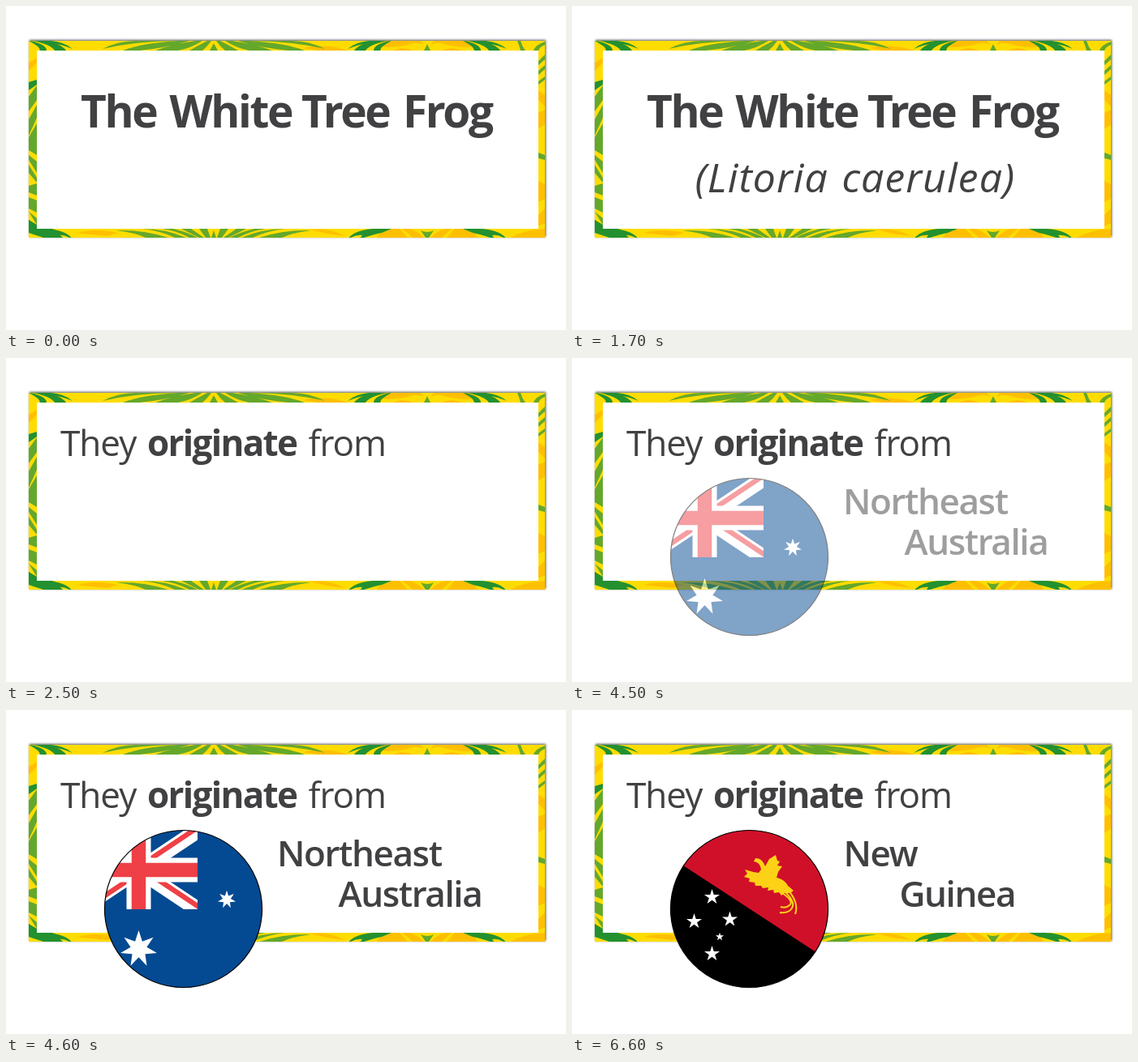
Recreate the animation shown at these times as an HTML page. Size 690x400 px, loop 8 s.

```html
<!DOCTYPE html>
<html lang="en">
<head>
<meta charset="utf-8">
<title>The White Tree Frog</title>
<style>
html, body { margin: 0; width: 100%; height: 100%; overflow: hidden; background: #fff; }
svg { display: block; }
text { font-family: "Open Sans", "Noto Sans", sans-serif; fill: #414042; }
.title { font-size: 55px; font-weight: 700; letter-spacing: -2.4px; }
.latin { font-size: 50px; font-style: italic; letter-spacing: 1.1px; }
.line { font-size: 44px; letter-spacing: -1px; }
.line .bold { font-weight: 700; letter-spacing: -1.7px; }
.place { font-size: 44px; font-weight: 600; letter-spacing: -1.4px; }
.dark { fill: #23912f; }
.green { fill: #64a82b; }
.orange { fill: #ffbf00; }
</style>
</head>
<body>
<svg width="690" height="400" viewBox="0 0 690 400">
  <defs>
    <clipPath id="card"><path d="M28 43H664V286H28Z"/></clipPath>
    <clipPath id="disc"><circle cx="218.5" cy="245.5" r="97"/></clipPath>
    <clipPath id="canton"><path d="M91 149H236V246H91Z"/></clipPath>
    <g id="fan" class="green">
      <path d="M137 53Q118 43 96 43H48Q100 44 137 53ZM112 55Q90 46 44 43H30Q60 52 92 55ZM72 55Q48 46 22 43H14Q28 52 44 55ZM30 55Q18 48 8 43H3Q8 50 14 55ZM0 55V46L5 55Z"/>
      <path d="M120 277Q86 276 56 286H84Q96 280 120 277ZM88 275Q60 275 34 286H48Q64 278 88 275ZM64 275H50Q30 280 20 286H30Q44 278 64 275ZM40 275H28L12 286H18ZM18 275H8L4 286H10ZM0 277L3 286H0Z"/>
    </g>
    <g id="frond" class="dark">
      <path d="M98 53Q84 41 58 43H44Q78 44 98 53ZM90 55Q84 46 62 43H50Q72 48 76 55ZM66 55Q66 48 50 44L44 43Q58 50 58 55Z"/>
      <path d="M44 275H64Q90 276 98 288Q88 282 80 283L84 288Q66 282 56 280Z"/>
    </g>
    <g id="bloom" class="orange">
      <path d="M4 48Q14 43 24 48Q40 52 64 50Q56 44 50 43H8ZM18 55Q30 49 42 55Z"/>
      <path d="M4 286Q14 276 24 275H30L18 286ZM24 286L34 275H50Q60 280 62 286Z"/>
      <path class="green" d="M0 47L4 55H0ZM0 279Q5 279 8 277L2 286H0Z"/>
    </g>
  </defs>

  <path d="M28 43H664V286H28Z" fill="#ffdc00" style="filter:drop-shadow(1.5px -.5px 1.5px #000a)"/>
  <g clip-path="url(#card)">
    <path class="orange" d="M365 52Q395 46 422 55H385ZM88 280Q110 274 138 280L124 284ZM376 276Q400 274 418 284L395 281ZM622 286Q640 276 664 275V286ZM28 70L38 64V70L28 80ZM656 104L664 110V124L656 116ZM656 132L664 128V146L656 152ZM656 216L664 220V238L656 242ZM656 258L664 250V268L656 272Z"/>
    <path class="green" d="M28 112L38 98V116L28 130ZM28 140L38 122V138L28 160ZM28 162L38 145V184L28 178ZM28 184L38 192V206L28 190ZM28 196L38 212V218L28 206ZM28 222L38 219V234L28 230ZM28 236L38 240V255L28 250ZM28 254L38 262V270Z"/>
    <path class="green" d="M634 55Q632 48 630 43H634Q636 50 640 55ZM664 44Q652 48 650 55H656Q658 50 664 48ZM656 68L664 60V66L656 73ZM656 80L664 73V78L656 85ZM656 93L664 87V91L656 97ZM656 181L664 184V190L656 188Z"/>
    <path class="dark" d="M28 104V94L38 91V97ZM28 264L38 270L60 276 70 286H46L28 280Z"/>
    <use href="#fan" x="256"/><use href="#fan" transform="translate(256)scale(-1 1)"/>
    <use href="#bloom" x="519"/><use href="#bloom" transform="translate(519)scale(-1 1)"/>
    <use href="#frond" x="519"/><use href="#frond" transform="translate(519)scale(-1 1)"/>
    <use href="#frond" x="-16"/>
  </g>
  <path d="M38 55H656V275H38Z" fill="#fff"/>

  <g id="intro">
    <text class="title" y="150"><tspan x="92">The</tspan> <tspan x="201.5">White</tspan> <tspan x="364">Tree</tspan> <tspan x="489">Frog</tspan></text>
    <text class="latin" id="latin" y="230"><tspan x="151.5">(Litoria</tspan> <tspan x="332.5">caerulea)</tspan></text>
  </g>

  <g id="origin">
    <text class="line" y="121"><tspan x="67">They</tspan> <tspan class="bold" x="174">originate</tspan> <tspan x="372.5">from</tspan></text>

    <g id="australia">
      <g clip-path="url(#disc)">
        <path d="M121 148H316V343H121Z" fill="#034a92"/>
        <g clip-path="url(#canton)" fill="none">
          <path d="M91 149L236 246M91 246L236 149" stroke="#fff" stroke-width="19"/>
          <path d="M161.7 194.8L238 143.8M165.3 200.2L89 251.2M165.3 194.8L241.6 245.8M161.7 200.2L85.4 149.2" stroke="#ee4046" stroke-width="6.2"/>
          <path d="M163.5 149V246M91 197.5H236" stroke="#fff" stroke-width="30"/>
          <path d="M163.5 149V246M91 197.5H236" stroke="#ee4046" stroke-width="17.5"/>
        </g>
        <path class="star" data-star="163.5 295 23 7 .444"/>
        <path class="star" data-star="272 234 11.3 7 .444"/>
      </g>
      <circle cx="218.5" cy="245.5" r="97" fill="none" stroke="#000" stroke-width="1.2"/>
      <text class="place"><tspan x="334" y="193">Northeast</tspan> <tspan x="409.5" y="243">Australia</tspan></text>
    </g>

    <g id="guinea">
      <g clip-path="url(#disc)">
        <path d="M121 148H316V343H121Z"/>
        <path d="M121 181.5L316 309V148H121Z" fill="#d01029"/>
        <path class="star" data-star="172.5 231 10 5 .382"/>
        <path class="star" data-star="150.5 261 10 5 .382"/>
        <path class="star" data-star="194.5 258.5 10 5 .382"/>
        <path class="star" data-star="182 280 5.3 5 .382"/>
        <path class="star" data-star="172.5 301 10 5 .382"/>
        <path fill="#fcd116" d="M226 183Q234 182 238 193L243 184 251 179 253 186 256 187 253 192 259 193 254 200 252 207Q262 209 266 217L273 223 269 226 262 226 258 229 255 225 249 226 248 222 241 223 242 219 235 220 233 217 226 217 225 213 218 212 219 208 212 206 216 202 213 197Q222 200 230 201L233 197Q232 188 224 187Z"/>
        <path fill="none" stroke="#fcd116" stroke-width="2" d="M266 222Q280 238 275 252M262 224Q277 238 270 246Q266 251 256 250M259 226Q274 236 268 241Q264 245 257 243"/>
      </g>
      <circle cx="218.5" cy="245.5" r="97" fill="none" stroke="#000" stroke-width="1.2"/>
      <text class="place"><tspan x="334.5" y="193">New</tspan> <tspan x="403.5" y="243">Guinea</tspan></text>
    </g>
  </g>
</svg>
<script>
const $ = id => document.getElementById(id);

function starPath(cx, cy, r, points, inner) {
  const corners = Array.from({ length: points * 2 }, (_, i) => {
    const a = i * Math.PI / points, d = i % 2 ? r * inner : r;
    return `${cx + d * Math.sin(a)} ${cy - d * Math.cos(a)}`;
  });
  return `M${corners.join("L")}Z`;
}

for (const star of document.querySelectorAll(".star")) {
  star.setAttribute("d", starPath(...star.dataset.star.split(" ").map(Number)));
  star.setAttribute("fill", "#fff");
}

function show(id, opacity) {
  const style = $(id).style;
  style.display = opacity ? "" : "none";
  style.opacity = Number(opacity);
}

function draw(now) {
  const t = now % 8000;
  show("intro", t < 2500);
  show("latin", t >= 500);
  show("origin", t >= 2500);
  show("australia", t < 4500 || t >= 6600 ? 0 : t < 4600 ? 0.5 : 1);
  show("guinea", t >= 6600);
  requestAnimationFrame(draw);
}
draw(0);
</script>
</body>
</html>
```
